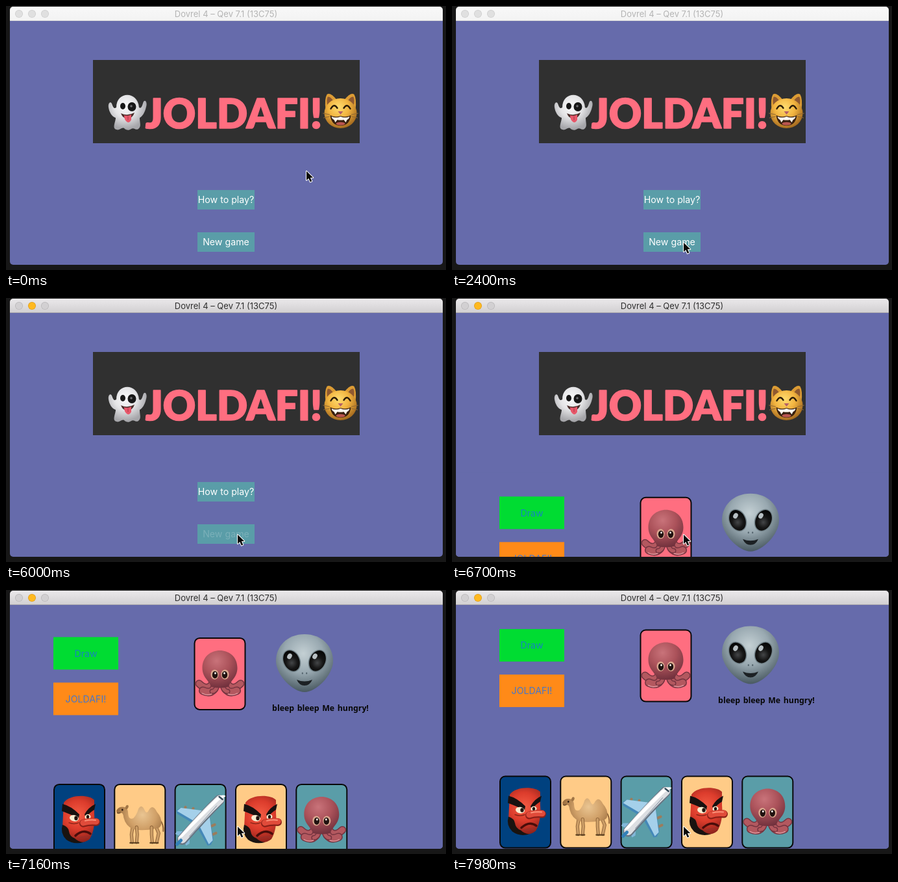
An HTML page with a canvas for the animation above (8000 ms loop, 678x406 px).

```html
<!DOCTYPE html>
<html lang="en">
<head>
<meta charset="utf-8">
<title>Card game</title>
<style>
html, body { margin: 0; width: 100%; height: 100%; overflow: hidden; background: #171717; }
canvas { display: block; }
</style>
</head>
<body>
<canvas id="stage" width="678" height="406"></canvas>
<script>
const c = document.getElementById('stage').getContext('2d');
const LOOP = 8000;
// Event times on the 50 fps recording clock, in ms
const FOCUS = 2240, PRESS = 2480, RELEASE = 2700, SLIDE = 2793;
const PURPLE = '#666bab', TEAL = '#5a9da8', CORAL = '#ff6e80', INK = '#080808', DARK = '#303030';
const PEACH = '#ffcb87', NAVY = '#00417f';

// Drawing helpers
function box(x, y, w, h, color) {
  c.fillStyle = color;
  c.fillRect(x, y, w, h);
}
function oval(x, y, rx, ry, color, turn = 0) {
  c.fillStyle = color;
  c.beginPath();
  c.ellipse(x, y, rx, ry, turn, 0, Math.PI * 2);
  c.fill();
}
function shape(d, color) {
  c.fillStyle = color;
  c.fill(new Path2D(d));
}
function line(d, color, width) {
  c.strokeStyle = color;
  c.lineWidth = width;
  c.lineCap = c.lineJoin = 'round';
  c.stroke(new Path2D(d));
}
function text(s, x, y, font, color) {
  c.font = font;
  c.fillStyle = color;
  c.textAlign = 'center';
  c.textBaseline = 'alphabetic';
  c.fillText(s, x, y);
}
function glow(x, y, r, ...colors) {
  const g = c.createRadialGradient(x, y, 0, x, y, r);
  colors.forEach((color, i) => g.addColorStop(i / (colors.length - 1), color));
  return g;
}
function at(x, y, draw) {
  c.save();
  c.translate(x, y);
  draw();
  c.restore();
}
function mirrored(draw) {
  draw();
  c.save();
  c.scale(-1, 1);
  draw();
  c.restore();
}

// Faces and figures, each centred on 0,0
function ghost() {
  shape('M-17 -8 C-17 -33 16 -34 18 -8 C22 -5 23 -12 25 -17 C28 -21 31 -15 29 -9 C27 0 23 6 19 8 ' +
    'C19 16 22 21 17 25 C13 28 10 22 6 25 C2 28 -2 27 -5 24 C-9 22 -12 28 -17 26 C-24 24 -18 14 -18 8 ' +
    'C-24 6 -28 -1 -29 -8 C-30 -15 -26 -18 -24 -14 C-22 -9 -21 -5 -17 -8 Z',
    glow(-3, -9, 34, '#fafafa', '#e4e4e6', '#a6a6aa'));
  oval(-7, -10, 4, 5, '#171717');
  oval(7, -9, 6.5, 7, '#171717');
  oval(6, -10, 1.8, 1.8, '#707074');
  shape('M-10 1 Q0 6 11 0 Q8 9 0 9 Q-7 9 -10 1 Z', '#4a2c28');
  shape('M-5 4 Q1 6 6 3 L6 11 Q3 17 -1 14 Q-5 11 -5 4 Z', '#e8576a');
  line('M1 6 L1 11', '#a83a48', 1);
}

function cat() {
  mirrored(() => {
    shape('M6 -18 Q16 -30 21 -26 Q25 -19 23 -3 Z', '#dc9c34');
    shape('M11 -16 Q17 -24 20 -22 Q22 -17 20 -8 Z', '#8f5930');
  });
  oval(0, 3, 25, 23, glow(-3, -6, 32, '#ffdd70', '#f2b440', '#a66c20'));
  mirrored(() => {
    line('M5 -5 Q10 -13 15 -4', '#2b1c08', 2.4);
    line('M17 5 L27 3 M17 8 L26 10', '#8f6834', 1);
  });
  shape('M-16 6 Q-8 10 0 7 Q8 10 16 6 Q14 22 0 22 Q-14 22 -16 6 Z', '#38200f');
  shape('M-14 8 Q-7 11 0 8 Q7 11 14 8 Q13 12 10 13 L8 17 L5 13 Q0 14 -5 13 L-8 17 L-10 13 Q-13 12 -14 8 Z', '#fffaf0');
  oval(0, 19, 7, 2.6, '#bb5550');
  shape('M-4 0 H4 L0 5 Z', '#b56066');
}

function octopus() {
  mirrored(() => {
    const arm = (d, width) => {
      line(d, '#743440', width);
      line(d, '#b3585f', width - 3);
    };
    arm('M10 12 C15 24 24 23 32 15', 12);
    arm('M7 15 C8 29 17 30 26 26', 13);
    arm('M4 17 C5 24 8 27 12 27', 8);
    line('M13 31 Q20 34 27 30', '#dc939a', 1.6);
  });
  shape('M-27 -9 C-27 -45 27 -45 27 -9 C27 5 17 10 13 20 Q0 23 -13 20 C-17 10 -27 5 -27 -9 Z',
    glow(-5, -20, 42, '#c9737a', '#ab525a', '#71313d'));
  mirrored(() => {
    oval(8, 1, 6, 7.5, '#dba88f');
    oval(7.5, 1.5, 4.2, 5.6, '#201210');
    oval(7, -1, 1.4, 1.7, '#faf4ee');
  });
}

function goblin() {
  shape('M-24 -27 C-14 -41 17 -39 23 -31 L23 -11 Q25 14 16 29 Q8 36 -4 34 Q-22 29 -26 10 Z',
    glow(-2, -8, 44, '#f45c44', '#dc3c2c', '#86201a'));
  shape('M-26 7 Q-17 10 -16 17 Q-15 25 -7 28 Q-2 33 6 34 Q-9 38 -20 30 Q-30 20 -26 7 Z', '#191310');
  shape('M-26 -25 Q-13 -22 0 -9 L-1 -3 Q-16 -10 -27 -14 Z', '#191110');
  shape('M8 -9 Q14 -20 25 -25 L23 -16 Q16 -12 10 -4 Z', '#191110');
  oval(-8, -3, 7, 4.8, '#faeed2', 0.2);
  oval(-5, -3, 2.7, 3.3, '#231510');
  oval(13, -5, 4.5, 4, '#faeed2', -0.3);
  oval(13, -5, 2.2, 2.8, '#231510');
  line('M-16 4 Q-8 7 -1 4', '#8d2518', 1.5);
  line('M6 5 Q14 2 26 3', '#8a2018', 12);
  line('M6 4 Q14 1 26 2', '#e04b3a', 9.5);
  line('M9 1 Q17 -1 25 0', '#fa9078', 2);
  line('M-6 24 Q6 13 17 21', '#4a0d0a', 3.5);
  line('M-1 28 Q7 24 13 27', '#97302a', 1.5);
}

function camel() {
  const leg = d => {
    line(d, '#8c6238', 5.2);
    line(d, '#cb9d66', 3.4);
  };
  leg('M-11 10 L-13 22 L-12 34');
  leg('M24 8 L29 20 L26 34');
  line('M31 0 Q37 7 36 17', '#8c6238', 2);
  shape('M-36 -15 Q-32 -22 -23 -20 Q-18 -18 -18 -9 Q-17 0 -10 -3 Q-5 -8 -2 -18 ' +
    'Q3 -26 8 -14 Q11 -9 14 -16 Q20 -25 26 -13 Q34 -4 33 5 Q33 12 24 13 Q5 17 -10 14 ' +
    'Q-22 9 -25 -4 Q-26 -12 -29 -11 Q-36 -7 -36 -15 Z',
    glow(4, -8, 42, '#eac592', '#d0a068', '#926639'));
  leg('M-5 11 L-4 22 L-5 34');
  leg('M18 11 L18 22 L19 34');
  line('M-8 35 h6 M16 35 h6 M-15 35 h5 M23 35 h5', '#5c4020', 2.2);
  line('M-35 -11 Q-32 -10 -30 -12', '#59402a', 1);
  oval(-27, -16, 1.3, 1.5, '#221510');
  oval(-20, -20, 2.2, 3.3, '#a07545', 0.4);
}

function plane() {
  line('M-11 -18 l-3 7 M-23 -20 l-3 7 M22 7 l-7 3 M24 20 l-7 3', '#9c7c5c', 4);
  shape('M10 -12 L-30 -19 L-37 -15 L-36 -10 L-8 7 Z M14 -6 L20 30 L16 38 L11 39 L-6 9 Z', '#4488b8');
  shape('M9 -14 L-30 -19 L-36 -14 L-7 3 Z M14 -6 L19 31 L13 37 L-2 8 Z', '#a5d0ea');
  shape('M-18 17 L-36 17 L-39 21 L-25 28 Z M-16 20 L-17 36 L-22 39 L-28 28 Z', '#82b8da');
  line('M-28 30 Q3 -5 29 -31', '#687684', 16);
  line('M-28 29 Q3 -7 30 -32', '#dcdee2', 13);
  shape('M-35 28 Q-4 -7 23 -33 Q34 -41 39 -37 Q36 -35 29 -31 Q2 -5 -28 26 Z', '#ffffff');
  line('M29 -36 l5 4', '#344b5b', 2.6);
  line('M-30 31 L-36 37', '#3380b8', 5);
  line('M-17 25 L25 -22', '#7c8c9c', 1);
}

function alien() {
  shape('M0 -44 C27 -44 44 -25 44 -3 C44 19 18 45 0 45 C-18 45 -44 19 -44 -3 C-44 -25 -27 -44 0 -44 Z',
    glow(-2, -14, 60, '#c4d0d4', '#98a8b0', '#46565e'));
  mirrored(() => {
    c.save();
    c.translate(20, -3);
    c.rotate(0.42);
    oval(0, 0, 13.5, 18, '#75858c');
    oval(0, 0, 12, 16.5, glow(1, 3, 18, '#444648', '#151515', '#060606'));
    c.restore();
    oval(3.2, 16, 1.1, 1.5, '#53636c');
  });
  oval(-23, -10, 3.5, 4.5, '#b8c0c4', 0.5);
  oval(16, -10, 3.5, 4.5, '#b8c0c4', 0.5);
  shape('M-12 26 Q0 31 12 26 Q8 35 0 35 Q-8 35 -12 26 Z', '#1c2124');
}

// Interface
function card(x, y, color, figure) {
  c.beginPath();
  c.roundRect(x + 1, y + 1, 78, 110, 8);
  c.fillStyle = color;
  c.fill();
  c.strokeStyle = INK;
  c.lineWidth = 2;
  c.stroke();
  c.save();
  c.clip();
  at(x + 40, y + 56, figure);
  c.restore();
}

const LABEL = '14.2px Inter, sans-serif';

function button(x, y, w, h, fill, label, color) {
  box(x, y, w, h, fill);
  text(label, x + w / 2, y + h / 2 + 5.2, LABEL, color);
}

function menu(t) {
  box(6, 23, 667, 375, PURPLE);
  box(134, 83, 411, 128, DARK);
  at(187, 164, ghost);
  at(515.5, 162, cat);
  text('JOLDAFI!', 351, 188, '900 62px Lato, sans-serif', CORAL);
  c.strokeStyle = CORAL;
  c.lineWidth = 1.6;
  c.lineJoin = 'round';
  c.strokeText('JOLDAFI!', 351, 188);
  button(295, 283, 88, 30, TEAL, 'How to play?', '#fff');
  let alpha = 1;
  if (t >= PRESS) alpha = t < RELEASE ? 0.2 : Math.min(1, 0.2 + (t - RELEASE) / 400);
  button(295, 348, 88, 30, TEAL, 'New game', `rgba(255,255,255,${alpha})`);
}

const HAND = [[73, NAVY, goblin], [166.3, PEACH, camel], [259.6, TEAL, plane],
  [353, PEACH, goblin], [446.3, TEAL, octopus]];

function table() {
  box(6, 23, 667, 375, PURPLE);
  button(73, 60, 100, 50, '#00dc32', 'Draw', '#1684c0');
  button(73, 130, 100, 50, '#ff8a18', 'JOLDAFI!', '#4976c8');
  card(289.5, 60.5, CORAL, octopus);
  at(460, 99.5, alien);
  c.wordSpacing = '1.5px';
  text('bleep bleep Me hungry!', 484.5, 173.5, '600 12.3px "Noto Sans", sans-serif', INK);
  c.wordSpacing = '0px';
  for (const [x, color, figure] of HAND) card(x, 285.5, color, figure);
}

function titleBar(active) {
  const g = c.createLinearGradient(0, 1, 0, 23);
  g.addColorStop(0, active ? '#ebe9eb' : '#f8f8f8');
  g.addColorStop(1, active ? '#d1cfd1' : '#f3f3f3');
  box(6, 1, 667, 22, g);
  box(6, 22, 667, 1, active ? '#aeacae' : '#d8d8d8');
  for (const x of [20, 40, 60]) {
    const lit = active && x === 40;
    oval(x, 12, 6, 6, lit ? '#dd9d1c' : active ? '#b9b7b9' : '#cdcdcd');
    oval(x, 12, 5.2, 5.2, lit ? '#ffb920' : active ? '#d2d0d2' : '#e0e0e0');
  }
  text('Dovrel 4 – Qev 7.1 (13C75)', 339, 17, '13px Inter, sans-serif', active ? '#2e2e2e' : '#b4b4b4');
}

const PATH = [[520, 463, 254], [680, 419, 301], [840, 356, 376], [980, 357, 364]];

function pointerAt(t) {
  const i = PATH.findIndex(p => t < p[0]);
  if (i === 0) return PATH[0].slice(1);
  if (i < 0) return PATH[PATH.length - 1].slice(1);
  const [t0, x0, y0] = PATH[i - 1], [t1, x1, y1] = PATH[i];
  let k = (t - t0) / (t1 - t0);
  if (i === 1) k *= k;
  else k = 1 - (1 - k) * (1 - k);
  return [x0 + (x1 - x0) * k, y0 + (y1 - y0) * k];
}

function pointer(t) {
  const d = 'M0 0 V14 L3.3 11 L5.8 16.6 L8.3 15.5 L5.9 10 H10.2 Z';
  at(...pointerAt(t), () => {
    line(d, '#fff', 2);
    shape(d, INK);
  });
}

// Remaining slide distance of a critically damped spring (mass 3, stiffness 1000)
function slideOffset(t) {
  const s = (t - SLIDE) / 1000 * Math.sqrt(1000 / 3);
  return 375 * (1 + s) * Math.exp(-s);
}

function draw(t) {
  box(0, 0, 678, 406, '#171717');
  c.save();
  c.beginPath();
  c.roundRect(6, 1, 667, 397, 5);
  c.clip();
  menu(t);
  if (t >= SLIDE) at(0, slideOffset(t), table);
  titleBar(t >= FOCUS);
  c.restore();
  pointer(t);
}

function recordingTime(t) {
  const rest = t % 140;
  const step = rest < 20 ? 0 : rest < 120 ? 1 : 2;
  return (Math.floor(t / 140) * 3 + step) * 20;
}

function tick() {
  draw(recordingTime(performance.now() % LOOP));
  requestAnimationFrame(tick);
}
tick();
</script>
</body>
</html>
```
